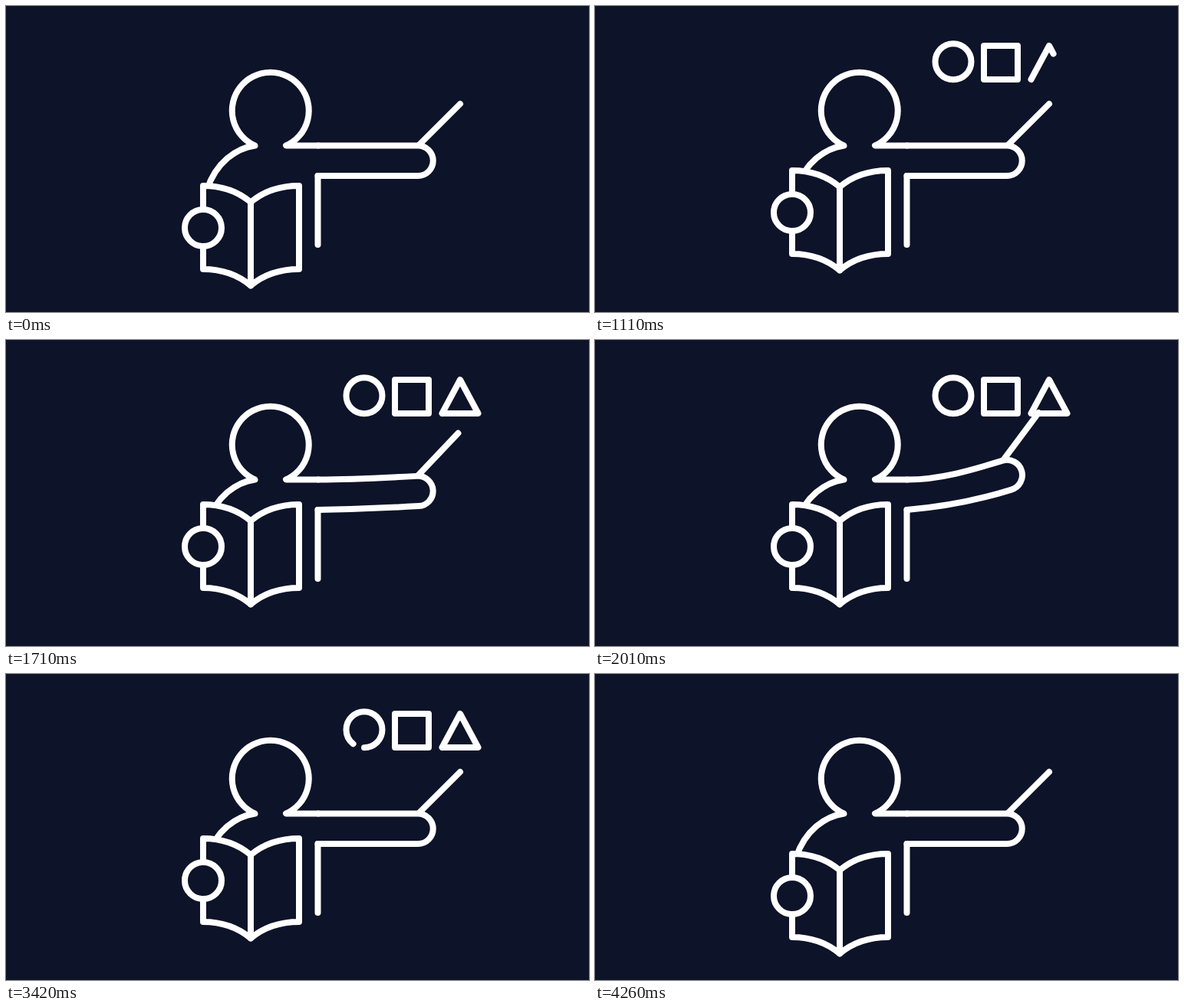
These frames come from a looping animation (760x400 px, 4500 ms). An HTML page:

```html
<!DOCTYPE html>
<html lang="en">
<head>
<meta charset="utf-8">
<title>Teacher with book</title>
<style>
  html, body { margin: 0; width: 100%; height: 100%; overflow: hidden; background: #0d1328; }
  svg { display: block; width: 100vw; height: 100vh; }
  .ink { fill: none; stroke: #fff; stroke-width: 8; stroke-linecap: round; stroke-linejoin: round; }
  .solid { fill: #0d1328; }
</style>
</head>
<body>
<svg viewBox="0 0 760 400">
  <g class="ink">
    <path d="M262 240C274 204 300 186 324.5 182.5A50 50 0 1 1 365 182.5H407"/>
    <path id="arm"/>
    <path id="stick"/>
    <path d="M406.5 222V312"/>
    <g id="book">
      <path class="solid" d="M257 215C281 215 303 223 319 236.5C335 223 357 215 382 215V324C357 324 335 332 319 345.5C303 332 281 324 257 324Z"/>
      <path d="M319 236.5V345.5"/>
      <circle class="solid" cx="257" cy="270" r="24"/>
    </g>
    <path class="shape" pathLength="1" d="M467 96.25A23.5 23.5 0 0 1 467 49.25A23.5 23.5 0 0 1 467 96.25"/>
    <path class="shape" pathLength="1" d="M507 96V52H551V96Z"/>
    <path class="shape" pathLength="1" d="M568.5 96L592 52L615.5 96Z"/>
  </g>
</svg>
<script>
const LOOP = 4500, TICK = 30;
const arm = document.getElementById('arm');
const stick = document.getElementById('stick');
const book = document.getElementById('book');
const shapes = document.querySelectorAll('.shape');

const ramp = (n, from, to) => Math.min(1, Math.max(0, (n - from) / (to - from)));
const smooth = u => u * u * (3 - 2 * u);
const pulse = (n, peak) => Math.pow(smooth(Math.max(0, 1 - Math.abs(n - peak) / 8)), 1.4);

// Point on the way from the resting arm to the raised one
const mix = (k, x0, y0, x1, y1) => [x0 + (x1 - x0) * k, y0 + (y1 - y0) * k];

function drawArm(k) {
  const top = mix(k, 537, 182.5, 528, 143);
  const low = mix(k, 537, 222, 546.5, 180);
  const r = Math.hypot(top[0] - low[0], top[1] - low[1]) / 2;
  arm.setAttribute('d',
    `M407 182.5C${mix(k, 450, 182.5, 450, 182.5)} ${mix(k, 494, 182.5, 488, 163)} ${top}` +
    `A${r} ${r} 0 0 1 ${low}` +
    `C${mix(k, 494, 222, 505, 201)} ${mix(k, 450, 222, 455, 216)} 406.5 222`);
  stick.setAttribute('d', `M${mix(k, 539, 181, 529.5, 141)}L${mix(k, 592, 128, 570, 75.5)}`);
}

function trim(el, start, end) {
  const len = end - start;
  el.style.display = len > 0.001 ? '' : 'none';
  el.setAttribute('stroke-dasharray', `${len} 2`);
  el.setAttribute('stroke-dashoffset', -start);
}

function render(ms) {
  const n = Math.floor((ms % LOOP) / TICK);
  const lift = smooth(ramp(n, 2, 13)) - smooth(ramp(n, 129.3, 142));
  book.setAttribute('transform', `translate(0 ${20 * (1 - lift)})`);
  shapes.forEach((el, i) => {
    const on = 12.8 + 10 * i, off = 113 + 9.5 * i;
    trim(el, ramp(n, off, off + 9.5), ramp(n, on, on + 10));
  });
  drawArm(1.11 * (pulse(n, 51.3) + pulse(n, 70.1)));
}

const begin = performance.now();
function loop() {
  render(performance.now() - begin);
  requestAnimationFrame(loop);
}
loop();
</script>
</body>
</html>
```
